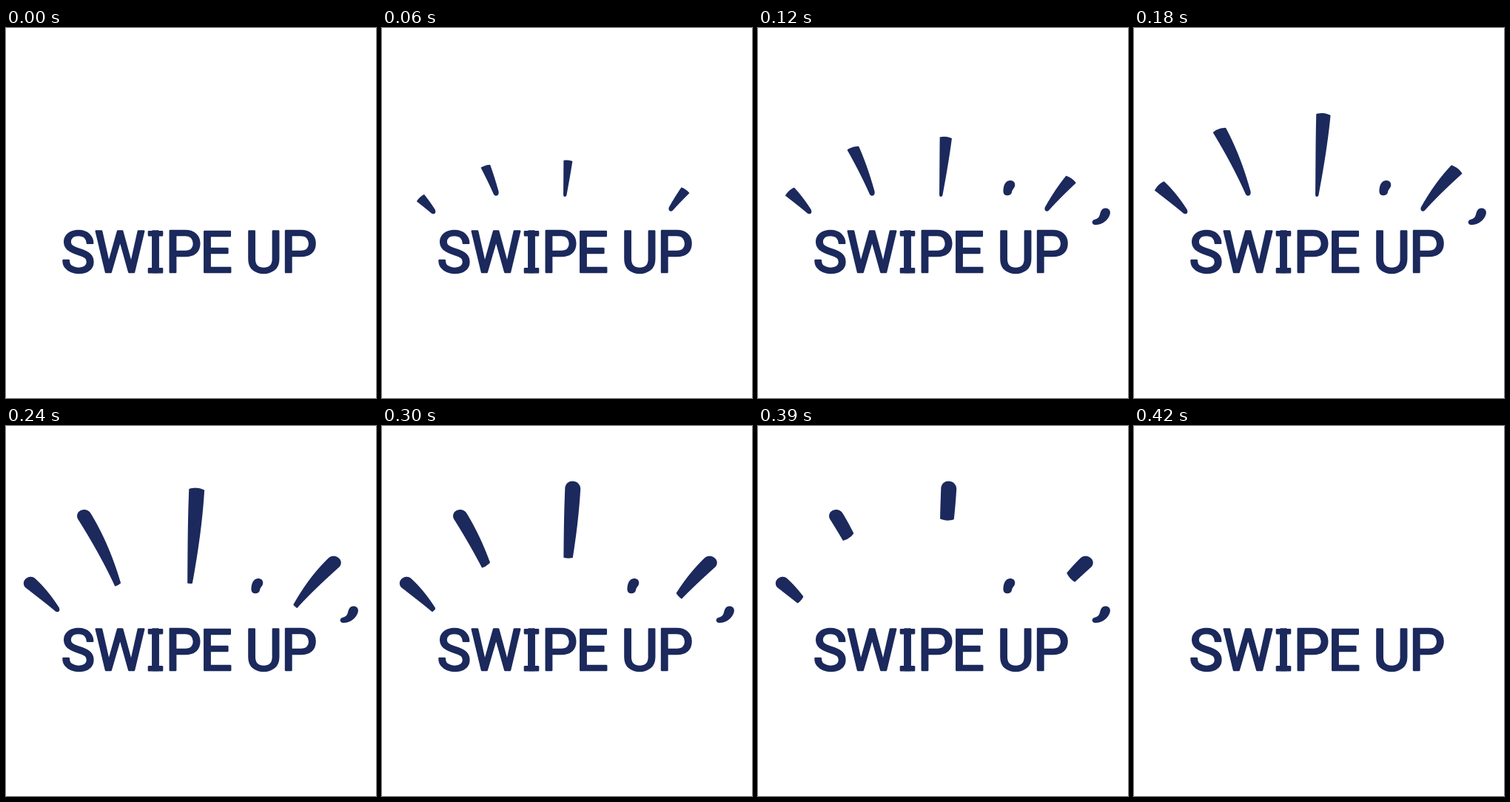
Write an HTML page that moves like this. It is 500 by 500 pixels and loops after 1020 ms.

```html
<!DOCTYPE html>
<html lang="en">
<head>
<meta charset="utf-8">
<title>Swipe up</title>
<style>
  html, body { margin: 0; width: 100%; height: 100%; overflow: hidden; background: #fff; }
  svg { display: block; width: 100vw; height: 100vh; fill: #1b295c; }
  text { font: 77px Roboto, Arial, sans-serif; text-anchor: middle; }
  text, .serif { stroke: #1b295c; stroke-width: 2.6; stroke-linejoin: round; }
</style>
</head>
<body>
<svg viewBox="0 0 500 500">
  <text y="330.2" x="97.3 153.7 202 239.8 283.8 315 348.3 396">SWIPE UP</text>
  <path class="serif" d="M193 275.3h18v4.8h-18zM193 325.4h18v4.8h-18z"/>
  <g id="rays"></g>
  <g id="dots">
    <path d="M341 206C346 206 348 210 347 214C346 217 343 219 343 222C342 226 338 227 335 226C331 225 331 220 332 215C333 210 336 206 341 206Z"/>
    <path d="M469 243.5C474 243 477 247 475.5 252C473 260 465 266 456 266C451 266 450 260.5 454.5 259C458.5 258 461 256 462 252C463 247 465 244 469 243.5Z"/>
  </g>
</svg>
<script>
const NS = 'http://www.w3.org/2000/svg';
const STEP = 30, LOOP = 1020, END = 14;

// x, y: tip; turn: degrees from upright; root, head: half widths; bend: sideways bow;
// span, grow: steps and power of the reveal; fade: power of the wipe
const rays = [
  { x: 71.5, y: 250.5, turn: -46, len: 63, root: 3, head: 9, bend: 1.5, span: 9, grow: .75, fade: 2.6 },
  { x: 155.5, y: 226.5, turn: -25.9, len: 125, root: 3.5, head: 9.5, bend: 3.7, span: 9, grow: 1, fade: 1 },
  { x: 247, y: 228, turn: 4.2, len: 154, root: 2, head: 10.5, bend: 1, span: 9.7, grow: 1, fade: 1 },
  { x: 388.5, y: 247, turn: 41.8, len: 92, root: 3, head: 9.5, bend: -2.7, span: 9, grow: .9, fade: 1.28 }
];

const group = document.getElementById('rays');
const dots = document.getElementById('dots');

function make(name, attrs, parent) {
  const el = document.createElementNS(NS, name);
  for (const key in attrs) el.setAttribute(key, attrs[key]);
  return parent.appendChild(el);
}

// Half width of a round end of radius r, at distance d from its end
const cap = (d, r) => d < r ? Math.sqrt(r * r - (r - d) ** 2) : Infinity;

// A bowed bar, widening from a small round tip to a large round head
function outline({ len, root, head, bend }) {
  const left = [], right = [];
  for (let d = 0; d <= len; d += .5) {
    const t = d / len;
    const taper = root + (head - root) * Math.sin(t * Math.PI / 2);
    const half = Math.min(taper, cap(d, root), cap(len - d, head));
    const mid = bend * 4 * t * (1 - t);
    left.push([mid - half, -d]);
    right.unshift([mid + half, -d]);
  }
  return 'M' + left.concat(right).join('L') + 'Z';
}

rays.forEach((ray, i) => {
  const clip = make('clipPath', { id: 'clip' + i }, group);
  ray.window = make('path', {}, clip);
  make('path', {
    d: outline(ray),
    transform: `translate(${ray.x} ${ray.y}) rotate(${ray.turn})`,
    'clip-path': `url(#clip${i})`
  }, group);
});

function draw(time) {
  const step = Math.floor(time % LOOP / STEP);
  const active = step > 0 && step < END;
  group.style.display = active ? '' : 'none';
  dots.style.display = active && step > 2 ? '' : 'none';
  for (const { window, len, span, grow, fade } of rays) {
    const top = len * Math.min(1, ((step + 1) / span) ** grow);
    const low = len * (Math.max(0, step - 7) / 9) ** fade;
    // Both cut edges bulge outwards; whole ends stay clear of the cut
    const upper = top < len ? 2 - top : -len - 5;
    const lower = low > 0 ? -low - 2 : 5;
    window.setAttribute('d',
      `M-14 ${lower}Q0 ${lower + 8} 14 ${lower}V${upper}Q0 ${upper - 8} -14 ${upper}Z`);
  }
}

let start;
function loop(now) {
  start ??= now;
  draw(now - start);
  requestAnimationFrame(loop);
}
requestAnimationFrame(loop);
</script>
</body>
</html>
```
